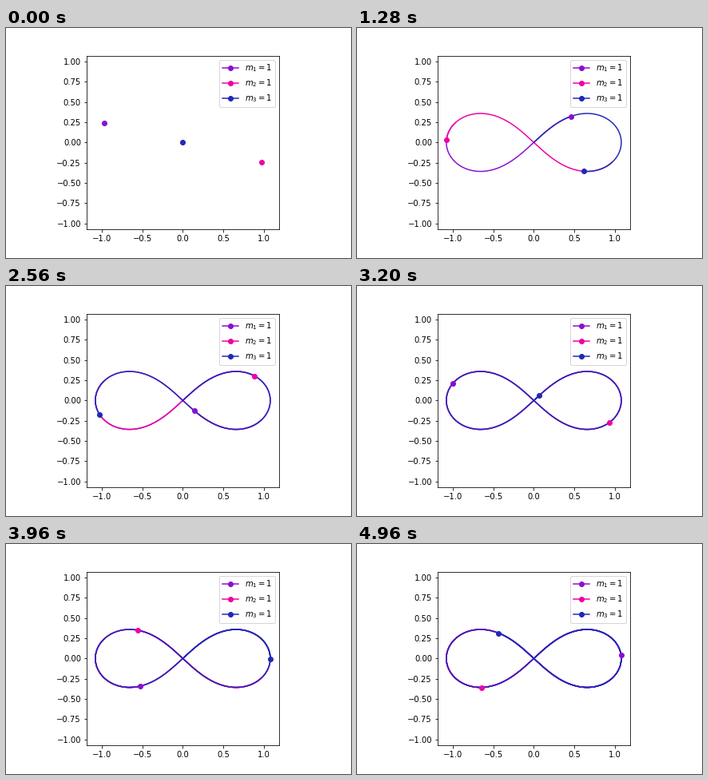
Animation, 432 px wide and 288 px high, one loop 5 s. Source, as a matplotlib script:

```python
import numpy as np
import matplotlib.pyplot as plt
from matplotlib.animation import FuncAnimation

FRAMES = 125
INTERVAL = 40      # ms
SUBSTEPS = 8       # integration steps per frame
DT = 0.01
COLORS = ["#8b0fd0", "#ee00a4", "#2029b8"]
X_LIM, Y_LIM = 1.1893, 1.0731


def acceleration(pos):
    """Gravity between equal unit masses, G = 1."""
    diff = pos[None, :, :] - pos[:, None, :]
    dist = np.sqrt((diff ** 2).sum(axis=2)) + np.eye(3)
    return (diff / dist[:, :, None] ** 3).sum(axis=1)


def derivative(state):
    pos, vel = state
    return np.array([vel, acceleration(pos)])


def rk4(state, h):
    k1 = derivative(state)
    k2 = derivative(state + h / 2 * k1)
    k3 = derivative(state + h / 2 * k2)
    k4 = derivative(state + h * k3)
    return state + h / 6 * (k1 + 2 * k2 + 2 * k3 + k4)


def figure_eight():
    """Positions of the three bodies on the figure-eight orbit."""
    start = np.array([-0.97000436, 0.24308753])
    speed = np.array([0.93240737, 0.86473146])
    state = np.array([[start, -start, 0 * start],
                      [-speed / 2, -speed / 2, speed]])
    path = [state[0]]
    for _ in range((FRAMES - 1) * SUBSTEPS):
        state = rk4(state, DT)
        path.append(state[0])
    return np.array(path)


path = figure_eight()

fig, ax = plt.subplots(figsize=(6, 4), dpi=72)
fig.subplots_adjust(left=0.125, right=0.9, bottom=0.125, top=0.88)
ax.set_aspect("equal")
ax.set_xlim(-X_LIM, X_LIM)
ax.set_ylim(-Y_LIM, Y_LIM)

trails = [ax.plot([], [], color=c, lw=1.5)[0] for c in COLORS]
bodies = [ax.plot([], [], "o", color=c, ms=6)[0] for c in COLORS]
keys = [ax.plot([], [], "o-", color=c, label=f"$m_{i}=1$")[0]
        for i, c in enumerate(COLORS, 1)]
ax.legend(handles=keys, loc="upper right")


def update(frame):
    now = frame * SUBSTEPS
    for i, (trail, body) in enumerate(zip(trails, bodies)):
        trail.set_data(path[:now + 1, i, 0], path[:now + 1, i, 1])
        body.set_data(path[now:now + 1, i, 0], path[now:now + 1, i, 1])
    return trails + bodies


anim = FuncAnimation(fig, update, frames=FRAMES, interval=INTERVAL,
                     repeat=True, repeat_delay=0)
plt.show()
```
